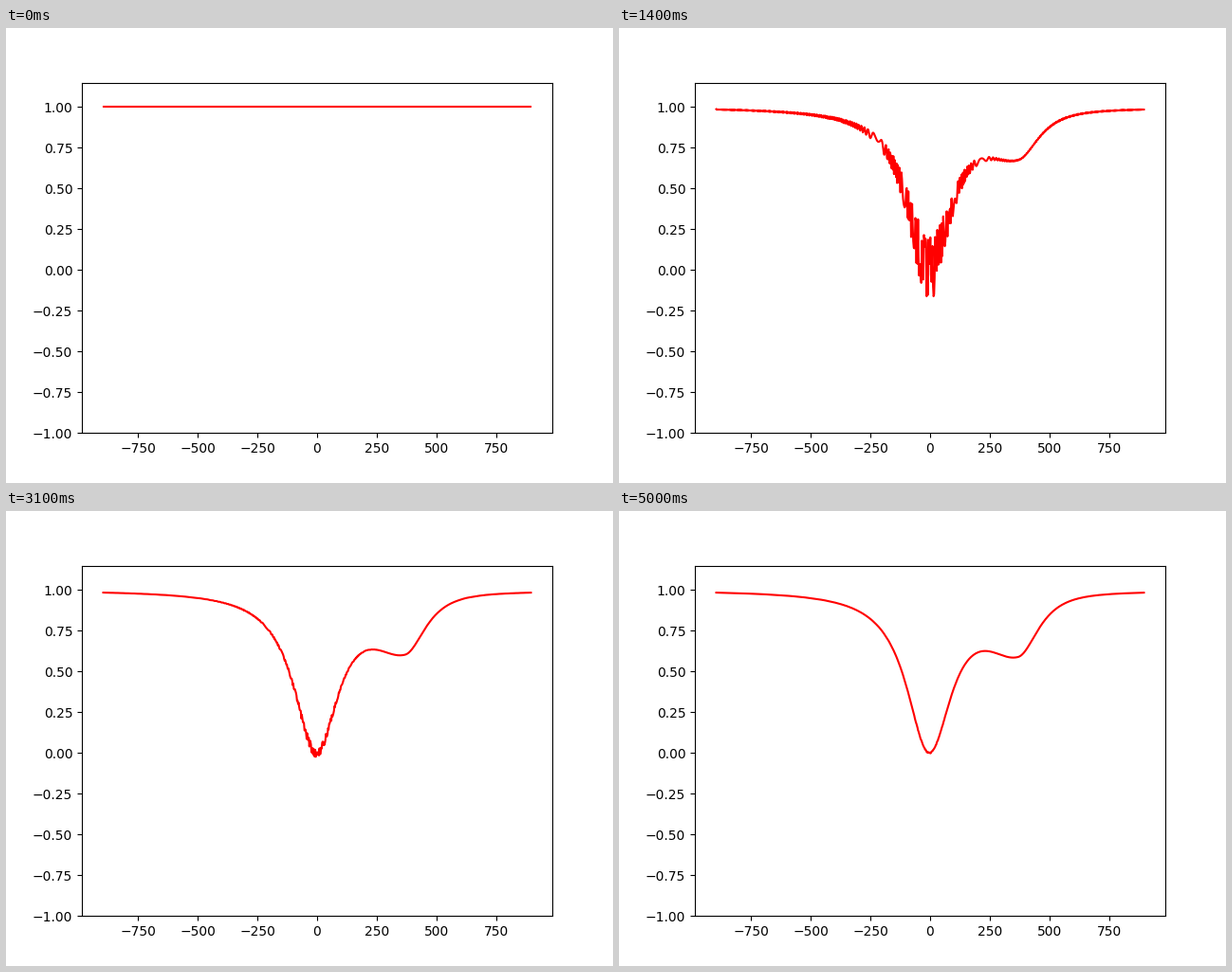
A matplotlib script for the animation above (5050 ms loop, 640 px wide and 480 px high).

```python
import numpy as np
import matplotlib.pyplot as plt
from matplotlib.animation import FuncAnimation

FRAMES = 101
INTERVAL = 50
SPAN = 895
RABI = 100.0
TURNS = 79 / 9                          # resonant Rabi turns per frame
PHASE_RATE = 2 * np.pi * TURNS / RABI

delta = np.linspace(-SPAN, SPAN, 800)
d = delta + 3                           # small shift of the resonance
freq = np.hypot(d, RABI)

coherent = RABI**2 / freq**2
steady = 12800 / (12800 + d**2)

# Incoherent side dip: steeper above its centre than below
offset = delta - 368
bump = 1 / np.cosh(offset / np.where(offset < 0, 122, 72))
side_dip = 0.337 * bump * d**2 / (d**2 + 3600)

damping = 0.0535 + 0.012 * (1 - coherent) + 0.04 * bump


def inversion(n):
    relaxed = 1 - np.exp(-0.049 * n)
    mean = 1 - coherent - (steady - coherent + side_dip) * relaxed
    wave = np.cos(PHASE_RATE * freq * n) * np.exp(-damping * n)
    return mean + coherent * wave


fig, ax = plt.subplots(figsize=(6.4, 4.8), dpi=100)
ax.set_xlim(-1.1 * SPAN, 1.1 * SPAN)
ax.set_ylim(-1, 1.15)
line, = ax.plot(delta, inversion(0), color="red", lw=1.5)


def update(n):
    line.set_ydata(inversion(n))
    return line,


anim = FuncAnimation(fig, update, frames=FRAMES, interval=INTERVAL,
                     repeat=True, repeat_delay=0)
plt.show()
```
